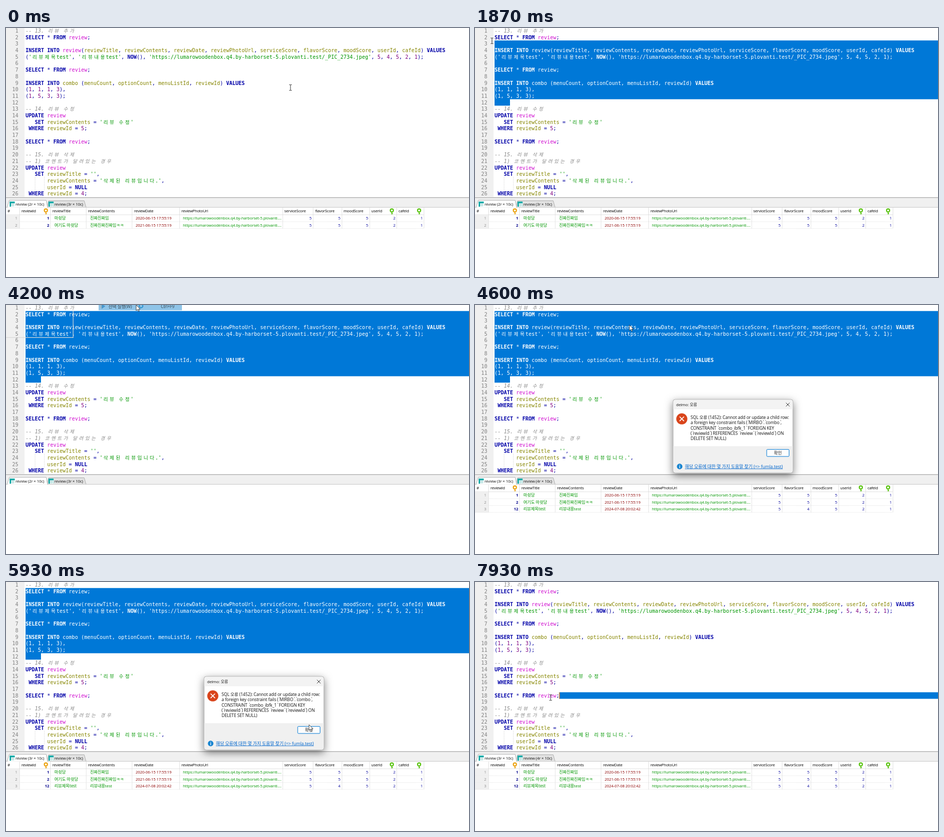
These frames come from a looping animation (900 by 485 pixels, 8 s). An HTML page:

```html
<!DOCTYPE html>
<html lang="ko">
<head>
<meta charset="utf-8">
<title>Query editor</title>
<style>
html, body { margin: 0; width: 100%; height: 100%; overflow: hidden; background: #fff; }
svg { display: block; width: 900px; height: 485px; }
text { white-space: pre; }
.ui { font-family: "Open Sans", "Noto Sans CJK KR", "Noto Sans CJK JP", "Noto Sans CJK", sans-serif; }
.mono { font: 9.97px "DejaVu Sans Mono", "Noto Sans Mono CJK KR", "Noto Sans CJK KR", "Noto Sans CJK JP", monospace; }
.ko { font-size: 9.4px; font-family: "Noto Sans CJK KR", "Noto Sans CJK JP", "Noto Sans CJK", sans-serif; }
.kw { fill: #0000a8; font-weight: bold; }
.tbl { fill: #d010d0; }
.id { fill: #868600; }
.num { fill: #800080; }
.str { fill: #009600; }
.sym { fill: #0000a0; }
.com { fill: #8a8a8a; font-style: italic; }
.picked text { fill: #fff; }
</style>
</head>
<body>
<svg id="stage" viewBox="0 0 900 485"></svg>
<script>
const LOOP = 8000, LEFT = 38, COL = 6, ROW = 12.7, TOP = -1.05;
const URL_HEAD = "https://lumarowoodenbox.q4.by-harborset-5.plovanti";

const code = [
  "-- 13. 리뷰 추가",
  "SELECT * FROM review;",
  "",
  "INSERT INTO review(reviewTitle, reviewContents, reviewDate, reviewPhotoUrl, serviceScore, flavorScore, moodScore, userId, cafeId) VALUES",
  `('리뷰제목test', '리뷰내용test', NOW(), '${URL_HEAD}.test/_PIC_2734.jpeg', 5, 4, 5, 2, 1);`,
  "",
  "SELECT * FROM review;",
  "",
  "INSERT INTO combo (menuCount, optionCount, menuListId, reviewId) VALUES",
  "(1, 1, 1, 3),",
  "(1, 5, 3, 3);",
  "     ",
  "-- 14. 리뷰 수정",
  "UPDATE review",
  "   SET reviewContents = '리뷰 수정'",
  " WHERE reviewId = 5;",
  "",
  "SELECT * FROM review;",
  "",
  "-- 15. 리뷰 삭제",
  "-- 1) 코멘트가 달려있는 경우",
  "UPDATE review",
  "   SET reviewTitle = '',",
  "       reviewContents = '삭제된 리뷰입니다.',",
  "       userId = NULL",
  " WHERE reviewId = 4;"
];

const lineTop = n => TOP + ROW * (n - 1);
const cols = s => [...s].reduce((n, c) => n + (c >= "가" ? 2 : 1), 0);
const rect = (x, y, w, h, fill, more = "") =>
  `<rect x="${x}" y="${y}" width="${w}" height="${h}" fill="${fill}" ${more}/>`;
const path = (d, stroke, more = "") => `<path d="${d}" fill="none" stroke="${stroke}" ${more}/>`;
const label = (x, y, s, size = 7.6, fill = "#111", more = "") =>
  `<text class="ui" x="${x}" y="${y}" font-size="${size}" fill="${fill}" letter-spacing="-.1" ${more}>${s}</text>`;
const group = (id, body) => `<g id="${id}">${body}</g>`;

function kind(s) {
  if (s.startsWith("--")) return "com";
  if (s[0] === "'") return "str";
  if (/^\d+$/.test(s)) return "num";
  if (/^[A-Z]+$/.test(s)) return "kw";
  if (s === "review") return "tbl";
  return /^\w/.test(s) ? "id" : "sym";
}

// Hangul takes two columns, everything else one
function codeLine(line, i) {
  const y = (lineTop(i + 1) + 9.9).toFixed(1);
  let out = "";
  for (const token of line.matchAll(/--.*|'[^']*'|\w+|[^\s\w']+/g)) {
    for (const part of token[0].matchAll(/[가-힣]|[^가-힣\s]+/g)) {
      const ko = part[0] >= "가";
      const x = LEFT + COL * cols(line.slice(0, token.index + part.index)) + (ko ? 1.5 : 0);
      out += `<text class="mono ${kind(token[0])}${ko ? " ko" : ""}" x="${x}" y="${y}">${part[0]}</text>`;
    }
  }
  return out;
}

function editor() {
  const text = code.map(codeLine).join("");
  const numbers = code.map((_, i) =>
    `<text class="mono" x="24" y="${(lineTop(i + 1) + 9.9).toFixed(1)}" text-anchor="end" fill="#808080">${i + 1}</text>`).join("");
  const guides = path("M56.5 290V316M74.5 290V316", "#c0c0c0", 'stroke-dasharray="1 1.5" stroke-width=".8"');
  return rect(0, 0, 36, 330, "#f0f0f0") + numbers + guides + text +
    `<clipPath id="clip"><path id="clipShape"/></clipPath><path id="sel" fill="#0078d7"/>` +
    `<g class="picked" clip-path="url(#clip)">${text}</g>` +
    group("caret", rect(163.4, 215, 1.3, 12.6, "#e8801c"));
}

const gridIcon = (x, y) => rect(x, y, 10, 10, "#14aaa8") +
  rect(x + 3, y + 3.5, 7, 6.5, "#eef8f8") + path(`M${x + 3} ${y + 6.7}h7M${x + 6.4} ${y + 3.5}v6.5`, "#8accca", 'stroke-width=".7"');

const tabs = () => rect(0, 329, 900, 20.5, "#f0f0f0") +
  path("M0 330.4H900", "#a0a0a0") + path("M0 349.3H900", "#bcbcbc", 'stroke-width=".8"') +
  `<path d="M80 349L83 336.5H152L155.5 349" fill="#e2e2e2" stroke="#a0a0a0" stroke-width=".8"/>` +
  `<path d="M2 349.8L6.5 335.5H78L81 349.8" fill="#fff" stroke="#a0a0a0" stroke-width=".8"/>` +
  gridIcon(7, 338) + gridIcon(82.5, 338) +
  label(18.5, 345.6, "", 7.6, "#111", 'id="tab0"') + label(94, 345.6, "", 7.6, "#111", 'id="tab1"');

const key = (x, fill) =>
  `<circle cx="${x}" cy="355.3" r="3" fill="none" stroke="${fill}" stroke-width="2.2"/>` +
  path(`M${x} 358V363M${x} 361.5h2`, fill, 'stroke-width="1.7"');

const edges = [26.5, 86.5, 156, 245, 337.5, 538, 597, 653, 707, 759.5, 812.5];
const heads = [[3, "#"], [30, "reviewId"], [90, "reviewTitle"], [159.5, "reviewContents"], [249, "reviewDate"],
  [341, "reviewPhotoUrl"], [541, "serviceScore"], [601, "flavorScore"], [656, "moodScore"], [710, "userId"], [763, "cafeId"]];

function tableRow(i, id, title, body, date, scores) {
  const y = 363.8 + 13.4 * i, base = y + 9.6, end = 'text-anchor="end"';
  const rights = [594, 650, 704, 757, 810];
  return rect(0, y, 26, 13.4, "#f0f0f0") +
    path(`M0 ${y + 13.4}H812`, "#d4d4d4", 'stroke-width=".7" stroke-dasharray="1 1"') +
    path(edges.map(x => `M${x} ${y}v13.4`).join(""), "#dadada", 'stroke-width=".7"') +
    label(22, base, i + 1, 7.4, "#888", end) +
    label(84, base, id, 7.6, "#00008c", end + ' font-weight="bold"') +
    label(94, base, title, 8.1, "#009600") + label(163.5, base, body, 8, "#009600") +
    label(252, base, date, 7.6, "#8c0000") +
    label(344, base, URL_HEAD + "....", 7.6, "#009600") +
    scores.map((n, k) => label(rights[k], base, n, 7.6, "#00009c", end)).join("");
}

function table() {
  const head = heads.map(([x, s]) => label(x, 359.4, s, 7.6, "#000", 'style="letter-spacing:-.2px"')).join("") +
    path(edges.map(x => `M${x} 350V363.8`).join("") + "M0 363.8H812", "#d4d4d4", 'stroke-width=".7"') +
    key(77.5, "#eca414") + key(750, "#5cc414") + key(803, "#5cc414");
  return head + tableRow(0, 1, "마쉿당", "진짜진짜임", "2020-06-15 17:55:19", [5, 5, 5, 2, 1]) +
    tableRow(1, 2, "여기도 마쉿당", "진짜진짜진짜임ㅋㅋ", "2021-06-15 17:55:19", [5, 5, 5, 2, 1]) +
    group("row3", tableRow(2, 12, "리뷰제목test", "리뷰내용test", "2024-07-08 20:02:42", [5, 4, 5, 2, 1]));
}

const runIcon = y => rect(183, y - 4, 5, 8, "#9db4c0") +
  `<path d="M186 ${y - 5}L193 ${y}L186 ${y + 5}z" fill="#2c86c4"/>`;
const firstItem = () => runIcon(2.5) + label(199, 5.8, "선택 실행(W)", 8.5) + label(301, 5.8, "Ctrl+F9", 8.2);

const menu = () => rect(178.5, -10, 166, 70, "#f2f2f2", 'stroke="#b4b4b4" filter="url(#soft)"') +
  group("hover", rect(180, -6, 162, 16.3, "#91c9f7")) + firstItem() + runIcon(17) +
  label(199, 20.2, "현재 쿼리 실행(X)", 8.5) + label(279, 20.2, "Shift+Ctrl+F9", 8.2) +
  path("M197 27.5H342", "#d4d4d4", 'stroke-width=".8"') + path("M184.5 36l2 2.3 4-5", "#222") +
  label(199, 39.2, "차례대로 쿼리 보내기(Y)", 8.5) + label(199, 54, "일괄 보내기(Z)", 8.5);

const ghost = () => rect(180, -6, 162, 16.3, "#8fc4e8") + `<g opacity=".72">${firstItem()}</g>`;

function dialog() {
  const lines = ["SQL 오류 (1452): Cannot add or update a child row:",
    "a foreign key constraint fails (`MIRBO`.`combo`,",
    "CONSTRAINT `combo_ibfk_1` FOREIGN KEY",
    "(`reviewId`) REFERENCES `review` (`reviewId`) ON",
    "DELETE SET NULL)"];
  // the interface font has very wide backticks
  const tighten = s => s.replace(/`/g, '<tspan letter-spacing="-2.5">`</tspan>');
  return rect(385, 184, 233, 143, "#fff", 'rx="4" stroke="#a0a0a0" filter="url(#deep)"') +
    `<path d="M385.5 203V188q0-3.5 3.5-3.5H614q3.5 0 3.5 3.5V203z" fill="#f3f3f3"/>` +
    `<path d="M385.5 275H617.5V323q0 3.5-3.5 3.5H389q-3.5 0-3.5-3.5z" fill="#f0f0f0"/>` +
    label(391, 197, "delmo: 오류", 7.8) + path("M604.5 190.5l7 7m0-7l-7 7", "#222", 'stroke-width=".9"') +
    `<circle cx="402" cy="221.8" r="10.8" fill="#d9451c"/>` +
    path("M397.7 217.5l8.6 8.6m0-8.6l-8.6 8.6", "#fff", 'stroke-width="1.7"') +
    lines.map((s, i) => label(419, 222.3 + 10.15 * i, tighten(s), 8.4)).join("") +
    rect(567, 281.3, 43.5, 13.7, "#fdfdfd", 'rx="1.5" stroke="#0078d4"') +
    label(588.7, 291.2, "확인", 8.4, "#222", 'text-anchor="middle"') +
    `<circle cx="397.8" cy="314.5" r="5.4" fill="#1784d0"/>` +
    path("M397.8 311.2v1.3m0 1.1v4.2", "#fff", 'stroke-width="1.3"') +
    label(408, 317.6, "해당 오류에 대한 몇 가지 도움말 찾기 (=> fumla.test)", 8.7, "#0066cc", 'text-decoration="underline"');
}

const pointers = () =>
  group("beam", path("M-2.5-5.5h2l.5.5.5-.5h2M0-5V5M-2.5 5.5h2l.5-.5.5.5h2", "#333")) +
  group("arrow", `<path d="M0 0V11l2.6-2.4 1.8 4 1.7-.8-1.7-3.8H8z" fill="#fff" stroke="#222" stroke-width=".8"/>` +
    group("busy", `<circle cx="9.5" cy="2" r="3.4" fill="none" stroke="#2b93d0" stroke-width="2"/>`));

const shadow = (id, dy, blur, alpha) => `<filter id="${id}" x="-30%" y="-30%" width="160%" height="160%">` +
  `<feDropShadow dx="0" dy="${dy}" stdDeviation="${blur}" flood-color="#000" flood-opacity="${alpha}"/></filter>`;

document.getElementById("stage").innerHTML =
  `<defs>${shadow("soft", 1.5, 2, .5)}${shadow("deep", 5, 8, .5)}</defs>` +
  rect(0, 0, 900, 485, "#fff") + editor() + tabs() + group("table", table()) +
  group("outline", path("M130.5 11V63.3H0", "#d8d8d8", 'stroke-width="1.2"')) +
  group("menu", menu()) + group("ghost", ghost()) + group("dialog", dialog()) + pointers();

const $ = id => document.getElementById(id);
// "inherit" keeps nested parts hidden along with their group
const show = (id, on) => $(id).setAttribute("visibility", on ? "inherit" : "hidden");

const at = {
  press: 1000, release: 2150, leave: 2600, menu: 2800, hover: 3600, run: 4130,
  result: 4270, error: 4400, confirm: 6130, click: 7500, reselect: 7870
};

// time, x, y
const route = [[0, 553, 116], [150, 553, 116], [900, 68, 145], [at.press, 68, 145], [1700, 33, 25], [1890, 33, 25],
  [2040, 33, 18], [at.release, 33, 18], [at.leave, 185, -20], [3450, 185, -20], [3850, 253, 0], [at.error, 253, 0],
  [5250, 589, 278], [at.confirm, 589, 278], [6800, 167, 228], [at.click, 167, 228],
  [7900, 147, 225], [LOOP, 147, 225]];

function cursorAt(t) {
  const i = route.findIndex(p => p[0] > t);
  const [t0, x0, y0] = route[i - 1], [t1, x1, y1] = route[i];
  const u = (t - t0) / (t1 - t0), k = u * u * (3 - 2 * u);
  return [x0 + (x1 - x0) * k, y0 + (y1 - y0) * k];
}

function block(n0, x0, n1, x1) {
  const a = lineTop(n0), b = lineTop(n1);
  if (n0 === n1) return `M${x0} ${a}H${x1}v${ROW}H${x0}z`;
  return `M${x0} ${a}H900V${b}H${x1}v${ROW}H${LEFT}V${a + ROW}H${x0}z`;
}

function selection(t, x, y) {
  if (t < at.press) return "";
  if (t < at.release) {
    const n = Math.floor((y - TOP) / ROW) + 1;
    const col = Math.max(0, Math.min(Math.round((x - LEFT) / COL), cols(code[n - 1])));
    return block(n, LEFT + COL * col, 12, 68);
  }
  if (t < at.click) return block(2, LEFT, 12, 68);
  return t < at.reselect ? "" : block(18, 164, 19, LEFT);
}

function draw(t) {
  const [x, y] = cursorAt(t), done = t >= at.result;
  const within = (a, b) => t >= a && t < b;
  const d = selection(t, x, y);
  $("sel").setAttribute("d", d);
  $("clipShape").setAttribute("d", d);
  show("caret", t >= at.reselect);
  show("menu", within(at.menu, at.run));
  show("hover", within(at.hover, at.run));
  show("ghost", within(at.run, at.error));
  show("outline", within(at.run, at.error));
  show("table", !within(at.run, at.result));
  show("row3", done);
  show("dialog", within(at.error, at.confirm));
  $("tab0").textContent = `review (${done ? 3 : 2}r × 10c)`;
  $("tab1").textContent = `review (${done ? 4 : 3}r × 10c)`;
  const arrow = within(at.leave, at.confirm);
  show("arrow", arrow);
  show("busy", within(at.run, at.error));
  show("beam", !arrow);
  $(arrow ? "arrow" : "beam").setAttribute("transform", `translate(${x} ${y})`);
}

let start;
function tick(now) {
  start ??= now;
  draw((now - start) % LOOP);
  requestAnimationFrame(tick);
}
draw(0);
requestAnimationFrame(tick);
</script>
</body>
</html>
```
